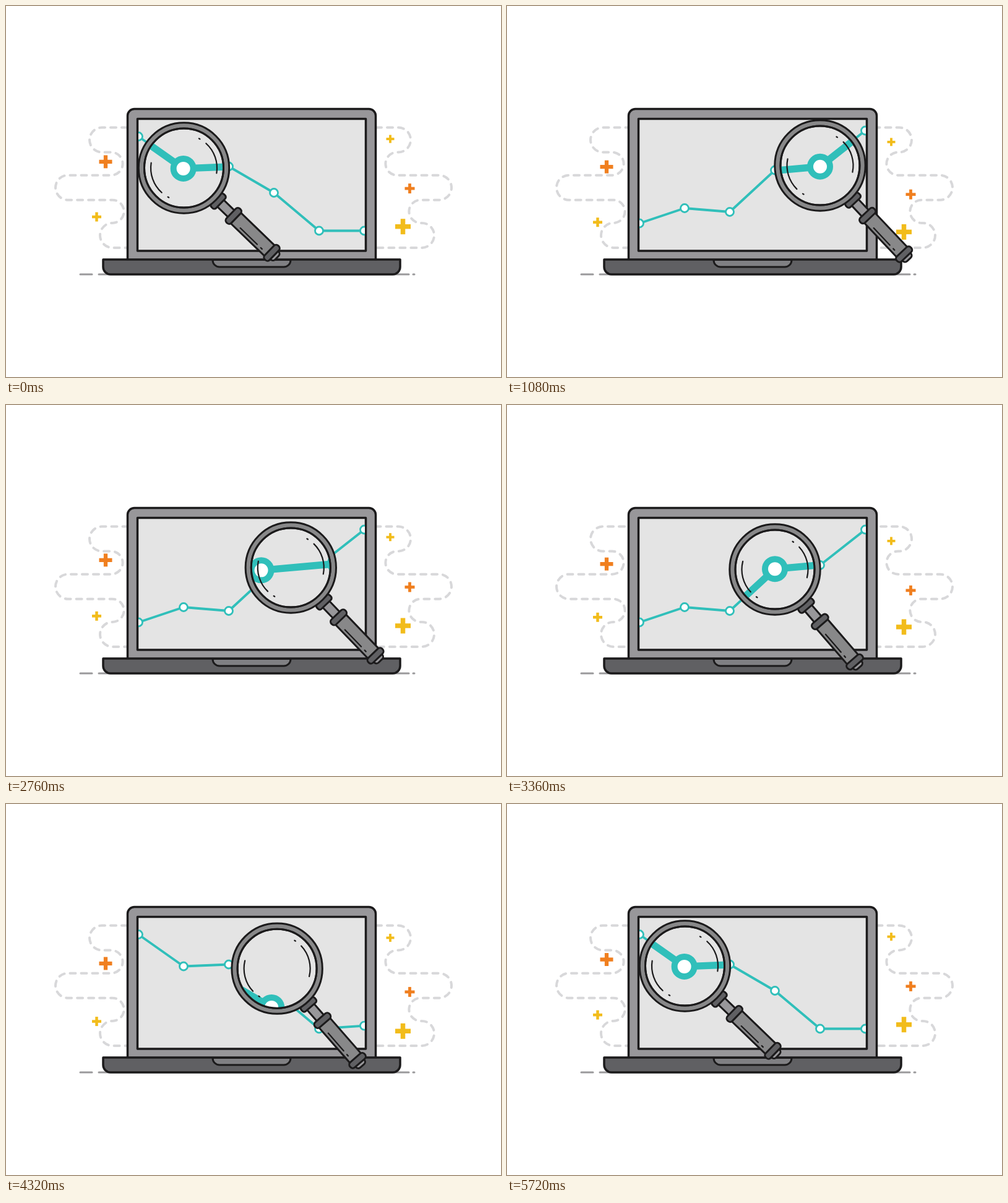
These frames come from a looping animation (800x600 px, 5760 ms). An HTML page with a canvas:

```html
<!DOCTYPE html>
<html lang="en">
<head>
<meta charset="utf-8">
<title>Laptop chart under a magnifier</title>
<style>
html, body { margin: 0; width: 100%; height: 100%; overflow: hidden; background: #fff; }
canvas { display: block; }
</style>
</head>
<body>
<canvas id="stage" width="800" height="600"></canvas>
<script>
const g = document.getElementById('stage').getContext('2d');
const LOOP = 5760, TAU = Math.PI * 2, DEG = Math.PI / 180;
const INK = '#1b1a1b', TEAL = '#30bfba', SCREEN = '#e4e4e4';
const DARK = '#606063', MID = '#888889', LIGHT = '#98979a', ORANGE = '#f07f1f', YELLOW = '#f2bc1b';

// Chart heights before and after; the points follow each other in turn
const FALL = [211, 262.5, 259.5, 302, 363.5, 363.5];
const RISE = [351.5, 327, 333, 265.5, 259, 201.5];
const POINT_TIME = 440, POINT_DELAY = 80, RISE_START = 85, FALL_START = 3590;

// Resting places of the magnifier and when it leaves them
const STOPS = [
  { x: 287.5, y: 262, tilt: 44, leave: 440 },
  { x: 506, y: 258, tilt: 46.6, leave: 2440 },
  { x: 433, y: 266, tilt: 49.2, leave: 4200 }
];
const MOVE_TIME = 600;

const PLUSES = [
  { x: 161, y: 254.9, size: 10.5, color: ORANGE, low: 1000 },
  { x: 146.5, y: 346.3, size: 7.5, color: YELLOW, low: 1480 },
  { x: 621, y: 215.7, size: 6.5, color: YELLOW, low: 780 },
  { x: 652.5, y: 299.5, size: 8, color: ORANGE, low: 1170 },
  { x: 641.5, y: 362, size: 12.5, color: YELLOW, low: 1480 }
];

// Pulls back first, then speeds up and settles softly
function ease(u, pull) {
  u = Math.min(1, Math.max(0, u));
  const v = 2 * u;
  return u < .5 ? v * v * ((pull + 1) * v - pull) / 2 : 1 - (2 - v) ** 4 / 2;
}

const mix = (a, b, k) => a + (b - a) * k;

function chartAt(t) {
  return FALL.map((y, i) => {
    const part = start => ease((t - start - POINT_DELAY * i) / POINT_TIME, 3.4);
    return [214 + 73 * i, mix(y, RISE[i], part(RISE_START) - part(FALL_START))];
  });
}

function lensAt(t) {
  let i = STOPS.length - 1;
  while (i > 0 && t < STOPS[i].leave) i--;
  const a = STOPS[i], b = STOPS[(i + 1) % STOPS.length];
  const u = Math.min(1, Math.max(0, (t - a.leave) / MOVE_TIME));
  const k = ease(u, 1.4), dx = b.x - a.x;
  // The handle trails behind, more so on long moves
  const drag = dx * Math.abs(dx) / 2500 * Math.sin(Math.PI * u) ** 4;
  return {
    x: mix(a.x, b.x, k),
    y: mix(a.y, b.y, k),
    tilt: (mix(a.tilt, b.tilt, ease(u, 3.4)) + drag) * DEG
  };
}

function paint(fill, width = 3) {
  g.fillStyle = fill;
  g.fill();
  g.strokeStyle = INK;
  g.lineWidth = width;
  g.stroke();
}

function box(x, y, w, h, r, fill, width) {
  g.beginPath();
  g.roundRect(x, y, w, h, r);
  paint(fill, width);
}

// Handle part lying along the x axis, centred on it
function part(x, length, half, r, fill) {
  box(x, -half, length, 2 * half, r, fill);
}

function disc(r, fill) {
  g.beginPath();
  g.arc(0, 0, r, 0, TAU);
  paint(fill);
}

function line(x0, x1, y) {
  g.beginPath();
  g.moveTo(x0, y);
  g.lineTo(x1, y);
  g.stroke();
}

// Winding outline: rows joined by half circles that alternate sides
function drawCloud(edge, turns, leftFirst) {
  let y = 196.5;
  g.beginPath();
  g.moveTo(edge, y);
  turns.forEach((x, i) => {
    const r = i % 2 ? 18.6 : 20;
    g.arc(x, y + r, r, -Math.PI / 2, Math.PI / 2, (i % 2 === 0) === leftFirst);
    y += 2 * r;
  });
  g.lineTo(edge, y);
  g.stroke();
}

function drawBackdrop(t) {
  g.strokeStyle = '#d8d8da';
  g.lineWidth = 4;
  g.setLineDash([9, 9]);
  g.lineDashOffset = -t / LOOP * 72;
  drawCloud(196, [155, 170, 100, 172, 172], true);
  drawCloud(598, [634, 632, 700, 670, 672], false);
  g.setLineDash([]);
  for (const { x, y, size, color, low } of PLUSES) {
    const cy = y + 5.3 * Math.cos(2 * TAU * (t - low) / LOOP);
    const half = size * .3;
    g.fillStyle = color;
    g.fillRect(x - size, cy - half, 2 * size, 2 * half);
    g.fillRect(x - half, cy - size, 2 * half, 2 * size);
  }
}

function drawLaptop() {
  g.strokeStyle = '#9a999b';
  g.lineWidth = 3;
  line(120, 139, 434);
  line(150, 651, 434);
  line(658, 660, 434);
  box(196.5, 166.5, 401, 245, [11, 11, 0, 0], LIGHT, 3.5);
  box(212.5, 182.5, 369, 213.5, 0, SCREEN, 3.5);
  box(157, 410, 480, 24, [0, 0, 12, 12], DARK, 3.5);
  box(334, 410.5, 126, 11.5, [0, 0, 11, 11], '#808083', 3);
}

function drawChart(points, width, r, ring) {
  g.strokeStyle = TEAL;
  g.lineWidth = width;
  g.beginPath();
  points.forEach(p => g.lineTo(...p));
  g.stroke();
  g.fillStyle = '#fff';
  g.lineWidth = ring;
  for (const [x, y] of points) {
    g.beginPath();
    g.arc(x, y, r, 0, TAU);
    g.fill();
    g.stroke();
  }
}

function drawGlare() {
  for (const [from, to] of [[88, 145], [73, 75]]) {
    for (const side of [0, 180]) {
      g.beginPath();
      g.arc(0, 0, 53.5, (from + side) * DEG, (to + side) * DEG);
      g.stroke();
    }
  }
}

function drawMagnifier(t, points) {
  const { x, y, tilt } = lensAt(t), zoom = 1.75;
  g.save();
  g.translate(x, y);

  g.save();
  g.rotate(tilt);
  part(80, 28, 7.5, 0, LIGHT);
  part(72, 10.5, 14.5, 4, DARK);
  part(199, 10, 9, [0, 5, 5, 0], LIGHT);
  part(114, 82, 11.8, 0, MID);
  part(106, 11, 15.6, 5, DARK);
  part(192, 11, 15.6, 5, DARK);
  g.lineWidth = 2.2;
  line(133, 171, 6.5);
  line(179, 182, 6.5);
  g.restore();

  disc(73.2, MID);
  disc(64, SCREEN);
  g.save();
  g.clip();
  drawChart(points.map(([px, py]) => [(px - x) * zoom, (py - y) * zoom]), 11.5, 16, 10);
  g.restore();
  g.beginPath();
  g.arc(0, 0, 64, 0, TAU);
  g.strokeStyle = INK;
  g.lineWidth = 3;
  g.stroke();

  g.rotate(tilt);
  g.lineWidth = 2.2;
  drawGlare();
  g.restore();
}

function draw(t) {
  const points = chartAt(t);
  g.fillStyle = '#fff';
  g.fillRect(0, 0, 800, 600);
  g.lineCap = g.lineJoin = 'round';
  drawBackdrop(t);
  drawLaptop();
  g.save();
  g.beginPath();
  g.rect(214, 184, 366, 210.5);
  g.clip();
  drawChart(points, 3.8, 6.5, 2.8);
  g.restore();
  drawMagnifier(t, points);
}

const start = performance.now();
function tick() {
  draw((performance.now() - start) % LOOP);
  requestAnimationFrame(tick);
}
tick();
</script>
</body>
</html>
```
